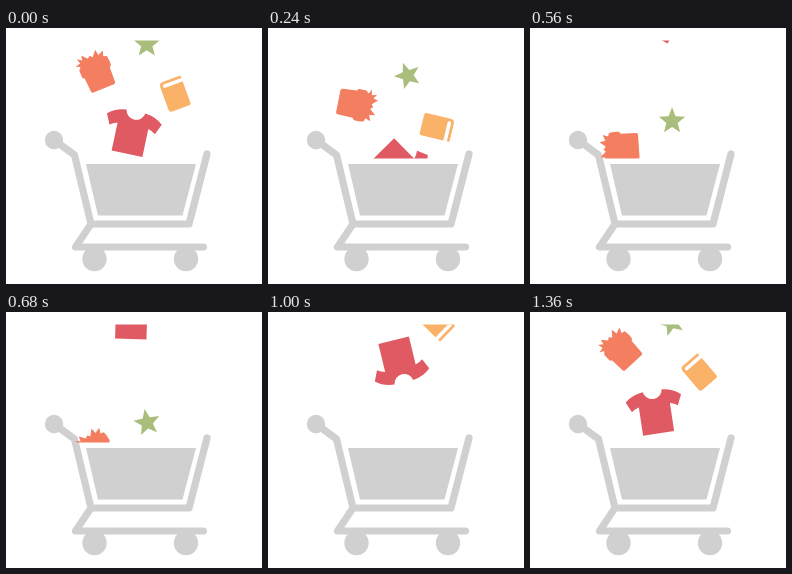
These frames come from a looping animation (256 by 256 pixels, 1.4 s). An HTML page:

```html
<!DOCTYPE html>
<html lang="en">
<head>
<meta charset="utf-8">
<title>Shopping cart</title>
<style>
  html, body { margin: 0; width: 100%; height: 100%; overflow: hidden; background: #fff; }
  svg { display: block; width: 100vw; height: 100vh; }
</style>
</head>
<body>
<svg viewBox="0 0 256 256">
  <defs>
    <clipPath id="drop"><rect x="0" y="12.6" width="256" height="118"/></clipPath>
  </defs>

  <g fill="#d0d0d0">
    <path d="M80 136H190L176.500 187.500H92Z"/>
    <circle cx="48" cy="112" r="9.200"/>
    <circle cx="88.500" cy="231" r="12.200"/>
    <circle cx="180" cy="231" r="12.200"/>
    <path d="M48 112L68.500 127L85 196H183L201 126M85 196L69.500 219H197.500"
      fill="none" stroke="#d0d0d0" stroke-width="7.200" stroke-linecap="round" stroke-linejoin="round"/>
  </g>

  <g clip-path="url(#drop)">
    <g id="pot" fill="#f47e60">
      <path d="M-15 -6L-12.500 -9L-17 -11L-11.500 -12.500L-13 -17.500L-8.500 -14.500L-7.500 -19.500L-2.500 -14
        L0 -16L2.500 -13.500L7.500 -19.500L8.500 -13.500L14.500 -16L12.500 -10.500L16 -9.500
        Q17 -4 16.500 0Q16 2 14.500 2L14 17.500Q14 19.400 12 19.400H-10Q-12 19.400 -12 17.500L-13 3
        Q-15 3 -15 1Z"/>
    </g>
    <g id="book">
      <path fill="#fab168" d="M-7.500 -15.500H10.500Q11.500 -15.500 11.500 -14.500V13.500Q11.500 15.500 9.500 15.500H-8.500
        Q-11.500 15.500 -11.500 12.500V-11.500Q-11.500 -15.500 -7.500 -15.500Z"/>
      <path fill="#fff" d="M12.500 -12.800H-7Q-8.700 -12.800 -8.700 -11T-7 -9.200H12.500Z"/>
    </g>
    <g id="star"><path fill="#a9bd7d"/></g>
    <g id="shirt">
      <path fill="#e05a64" transform="translate(-2.700 0)" d="M-9.600 -21.700A9.700 9.700 0 0 0 9.600 -21.700
        Q21 -20.500 28 -14L23.200 -3.500Q20 -6 15.700 -7.200V21.500H-15.700V-7.200Q-20 -6 -23.200 -3.500L-28 -14
        Q-21 -20.500 -9.600 -21.700Z"/>
    </g>
  </g>
</svg>
<script>
  const LOOP = 1400, STEP = 40;
  const FALL = 194;   // distance travelled per loop
  const TOP = -32;    // height at which an item re-enters
  const el = id => document.getElementById(id);

  const items = [
    { node: el('pot'), x: 89.5, y: 42.7, angle: -22 },
    { node: el('book'), x: 169, y: 66, angle: -20 },
    { node: el('star'), x: 140.8, y: 15.1, angle: 0 },
    { node: el('shirt'), x: 128.1, y: 105.3, angle: 12 }
  ];

  function starPath(r, cy) {
    const points = [];
    for (let i = 0; i < 10; i++) {
      const a = i * Math.PI / 5, d = i % 2 ? r * 0.43 : r;
      points.push((d * Math.sin(a)).toFixed(2) + ' ' + (cy - d * Math.cos(a)).toFixed(2));
    }
    return 'M' + points.join('L') + 'Z';
  }
  el('star').firstChild.setAttribute('d', starPath(13.8, 1.3));

  function draw(ms) {
    const p = Math.floor(ms % LOOP / STEP) * STEP / LOOP;
    for (const { node, x, y, angle } of items) {
      const fall = (y + p * FALL - TOP) % FALL + TOP;
      node.setAttribute('transform', `translate(${x} ${fall}) rotate(${angle + p * 720})`);
    }
  }

  const start = performance.now();
  function tick() {
    draw(performance.now() - start);
    requestAnimationFrame(tick);
  }
  tick();
</script>
</body>
</html>
```
